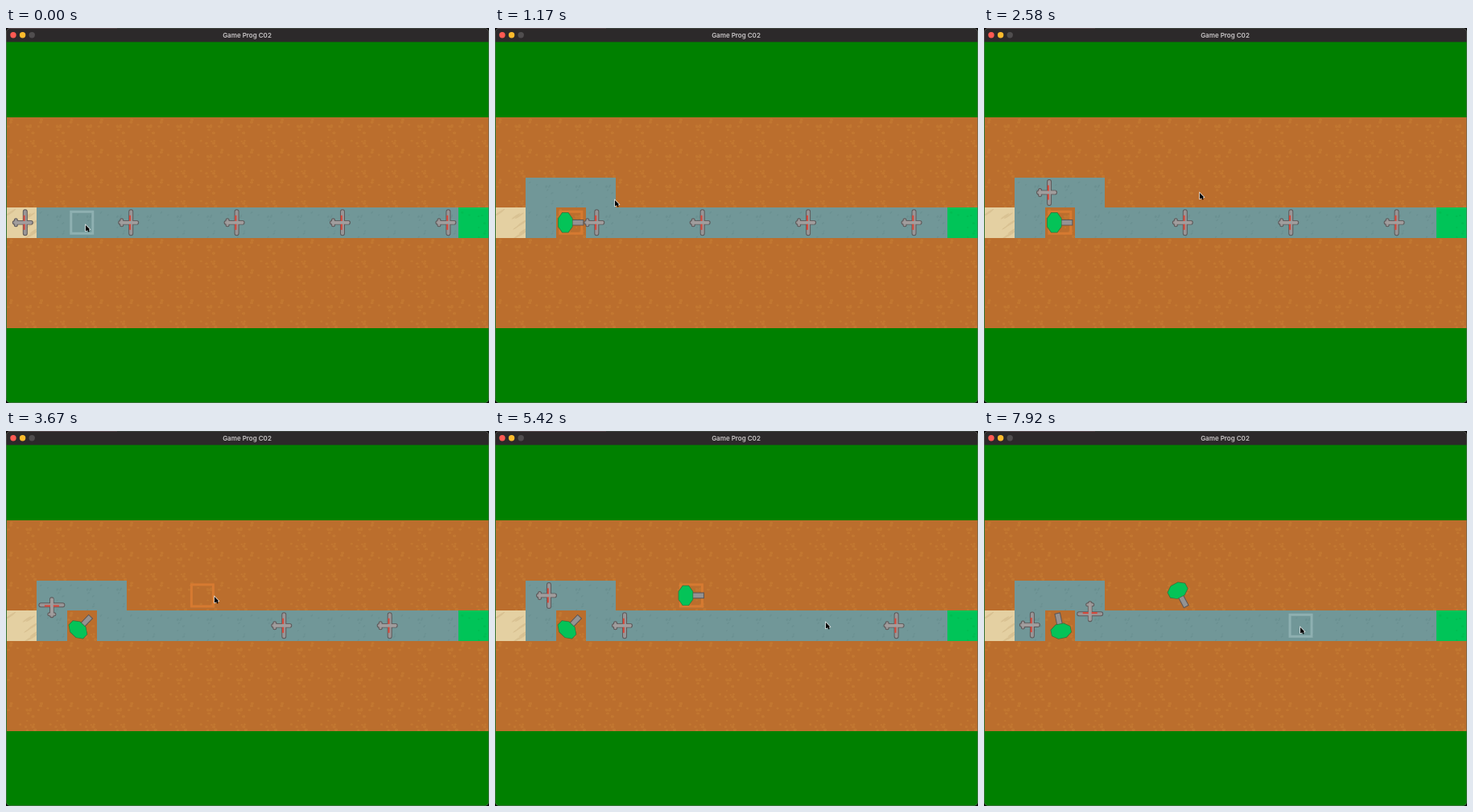
These frames come from a looping animation (600 px wide and 466 px high, 8 s). An HTML page with a canvas:

```html
<!DOCTYPE html>
<html lang="en">
<head>
<meta charset="utf-8">
<title>Game Prog C02</title>
<style>
  html, body { margin: 0; width: 100%; height: 100%; overflow: hidden; background: #000; }
  canvas { display: block; width: 600px; height: 466px; }
</style>
</head>
<body>
<canvas id="stage" width="600" height="466"></canvas>
<script>
const ctx = document.getElementById('stage').getContext('2d');
const LOOP = 8000, TILE = 37.4, LEFT = 0.8, BAR = 17.4, TOP = BAR + 2.5 * TILE;
const SPEED = 0.0876, SPAWN_EVERY = 1500, FIRST_SPAWN = -14, EXIT_X = 572;
const RELOAD = 2500;

const centre = ([col, row]) => ({ x: LEFT + (col + 0.5) * TILE, y: TOP + (row + 0.5) * TILE });
const straight = [[0, 3], [15, 3]].map(centre);
const detour = [[0, 3], [1, 3], [1, 2], [3, 2], [3, 3], [15, 3]].map(centre);

const towers = [
  { cell: [2, 3], placed: 680, shots: [] },
  { cell: [6, 2], placed: 4130, shots: [] }
];
const selections = [
  { from: 0, cell: [2, 3] },
  { from: 3170, cell: [6, 2] },
  { from: 7250, cell: [10, 3] }
];
const pointerStops = [
  { at: 650, x: 99, y: 245 },
  { at: 1170, x: 149, y: 214 },
  { at: 2580, x: 268, y: 205 },
  { at: 3150, x: 259, y: 206 },
  { at: 4200, x: 259, y: 206 },
  { at: 5420, x: 411, y: 238 },
  { at: 6580, x: 393, y: 244 }
];

function random(seed) {
  return () => (seed = (seed * 16807) % 2147483647) / 2147483647;
}

function makeTile(base, spot, count, rx, ry, tilt = 0) {
  const tile = document.createElement('canvas');
  tile.width = tile.height = 75;
  const g = tile.getContext('2d'), rnd = random(4711);
  g.fillStyle = base;
  g.fillRect(0, 0, 75, 75);
  g.fillStyle = spot;
  for (let i = 0; i < count; i++) {
    const k = 0.5 + rnd() * 0.5;
    g.beginPath();
    g.ellipse(rnd() * 75, rnd() * 75, rx * k, ry * k, tilt, 0, 7);
    g.fill();
  }
  return tile;
}

const soil = makeTile('#bb6e2d', '#c27731', 18, 5, 4);
const road = makeTile('#719798', '#6b9192', 12, 4, 2, -0.7);
const sand = makeTile('#e4d0a2', '#d9c293', 8, 18, 3, -0.6);
const goal = makeTile('#00c458', '#00bc52', 9, 4, 3);

function along(path, distance) {
  for (let i = 1; i < path.length; i++) {
    const a = path[i - 1], dx = path[i].x - a.x, dy = path[i].y - a.y;
    const length = Math.hypot(dx, dy);
    if (distance <= length || i === path.length - 1) {
      const k = distance / length;
      return { x: a.x + dx * k, y: a.y + dy * k, angle: Math.atan2(dy, dx) };
    }
    distance -= length;
  }
}

// Planes spawned before the first tower keep to the straight road
function planeAt(index, t) {
  const path = index > 0 ? detour : straight;
  const distance = (t - FIRST_SPAWN - index * SPAWN_EVERY) * SPEED;
  if (distance < 0) return null;
  const plane = along(path, distance);
  plane.angle = along(path, Math.max(0, distance - 3)).angle;
  return plane.x < EXIT_X ? { index, ...plane } : null;
}

function planesAt(t) {
  const planes = [];
  for (let i = -4; i * SPAWN_EVERY < LOOP; i++) planes.push(planeAt(i, t));
  return planes.filter(Boolean);
}

// Each tower hits the nearest plane whenever it has reloaded
const hits = new Map();
for (const tower of towers) {
  const from = centre(tower.cell);
  const range = p => Math.hypot(p.x - from.x, p.y - from.y);
  for (let at = tower.placed + RELOAD; at < LOOP; at += RELOAD) {
    const target = planesAt(at).sort((a, b) => range(a) - range(b))[0];
    tower.shots.push({ at, angle: Math.atan2(target.y - from.y, target.x - from.x) });
    hits.set(target.index, at);
  }
}

function rect(color, x, y, w, h) {
  ctx.fillStyle = color;
  ctx.fillRect(x, y, w, h);
}

function shape(fill, stroke, width, trace) {
  ctx.beginPath();
  trace();
  ctx.lineWidth = width;
  ctx.strokeStyle = stroke;
  ctx.stroke();
  ctx.fillStyle = fill;
  ctx.fill();
}

function posed({ x, y }, angle, draw) {
  ctx.save();
  ctx.translate(x, y);
  ctx.rotate(angle);
  draw();
  ctx.restore();
}

function drawPlane(plane) {
  posed(plane, plane.angle, () => {
    shape('#999596', '#5d5859', 2, () => {
      ctx.roundRect(1, -15.5, 4, 31, 2);
      ctx.roundRect(-10, -4.5, 3, 9, 1.5);
      ctx.roundRect(-12, -1.8, 24, 3.6, 1.8);
    });
    rect('#d8483a', 0.8, -9, 2, 18);
    rect('#a19d9d', -10, -1.9, 21, 3.8);
  });
}

function drawTower({ cell, placed, shots }, t) {
  if (t < placed) return;
  const last = shots.findLast(s => t >= s.at);
  posed(centre(cell), last ? last.angle : 0, () => {
    shape('#949393', '#5a5455', 2, () => ctx.rect(1, -2.8, 14, 5.6));
    shape('#04c358', '#3f6b3a', 1.4, () => {
      for (let i = 0; i < 8; i++) {
        const a = (i + 0.5) * Math.PI / 4;
        ctx.lineTo(-7 + 9.3 * Math.cos(a), 13 * Math.sin(a));
      }
      ctx.closePath();
    });
  });
}

function drawSelection(t) {
  const { cell } = selections.findLast(s => t >= s.from);
  const { x, y } = centre(cell);
  ctx.strokeStyle = tileAt(...cell, t) === soil ? '#d67a31' : '#8eb0b1';
  ctx.lineWidth = 3;
  ctx.strokeRect(x - 13.5, y - 13.5, 27, 27);
}

function drawPointer(t) {
  const next = pointerStops.find(p => p.at > t) || pointerStops.at(-1);
  const prev = pointerStops.findLast(p => p.at <= t) || next;
  const u = next === prev ? 0 : (t - prev.at) / (next.at - prev.at);
  const k = u * u * (3 - 2 * u);
  const tip = { x: prev.x + (next.x - prev.x) * k, y: prev.y + (next.y - prev.y) * k };
  posed(tip, 0, () => {
    shape('#000', '#eee', 1.4, () => {
      ctx.moveTo(0, 0);
      ctx.lineTo(0, 7.2);
      ctx.lineTo(5.2, 5.3);
      ctx.closePath();
    });
    posed({ x: 1.8, y: 5 }, -0.4, () => rect('#000', 0, 0, 1.5, 3.8));
  });
}

function tileAt(col, row, t) {
  const blocked = t >= towers[0].placed;
  if (row === 2) return blocked && col > 0 && col < 4 ? road : soil;
  if (row !== 3) return soil;
  if (col === 0) return sand;
  if (col === 15) return goal;
  return blocked && col === 2 ? soil : road;
}

function drawMap(t) {
  for (let row = 0; row < 7; row++) {
    for (let col = 0; col < 16; col++) {
      ctx.drawImage(tileAt(col, row, t), LEFT + col * TILE, TOP + row * TILE, TILE + 0.3, TILE + 0.3);
    }
  }
}

function drawWindow() {
  rect('#008000', 0, 0, 600, 466);
  rect('#2c292a', 0, 0, 600, BAR);
  rect('#171416', 0, 0, 600, 1);
  rect('#4b2536', 0, 0, 138, 1);
  ['#ff5a52', '#fdbb2d', '#504d4e'].forEach((color, i) => {
    ctx.fillStyle = color;
    ctx.beginPath();
    ctx.arc(9 + i * 11.6, 8.8, 3.7, 0, 7);
    ctx.fill();
  });
  ctx.fillStyle = '#c9c6c7';
  ctx.font = '600 8px Inter, sans-serif';
  ctx.textAlign = 'center';
  ctx.fillText('Game Prog C02', 299.5, 11.6);
}

function drawFrame() {
  ctx.beginPath();
  ctx.rect(0, 0, 600, 466);
  ctx.roundRect(0, 0, 600, 466, 5);
  ctx.fillStyle = '#0c0a0b';
  ctx.fill('evenodd');
  ctx.beginPath();
  ctx.roundRect(0.4, 0.4, 599.2, 465.2, 5);
  ctx.strokeStyle = 'rgba(95, 105, 95, 0.8)';
  ctx.lineWidth = 0.8;
  ctx.stroke();
}

function render(t) {
  drawWindow();
  drawMap(t);
  drawSelection(t);
  towers.forEach(tower => drawTower(tower, t));
  planesAt(t).filter(p => !(t >= hits.get(p.index))).forEach(drawPlane);
  drawPointer(t);
  drawFrame();
}

const start = performance.now();
function tick() {
  render((performance.now() - start) % LOOP);
  requestAnimationFrame(tick);
}
tick();
</script>
</body>
</html>
```
